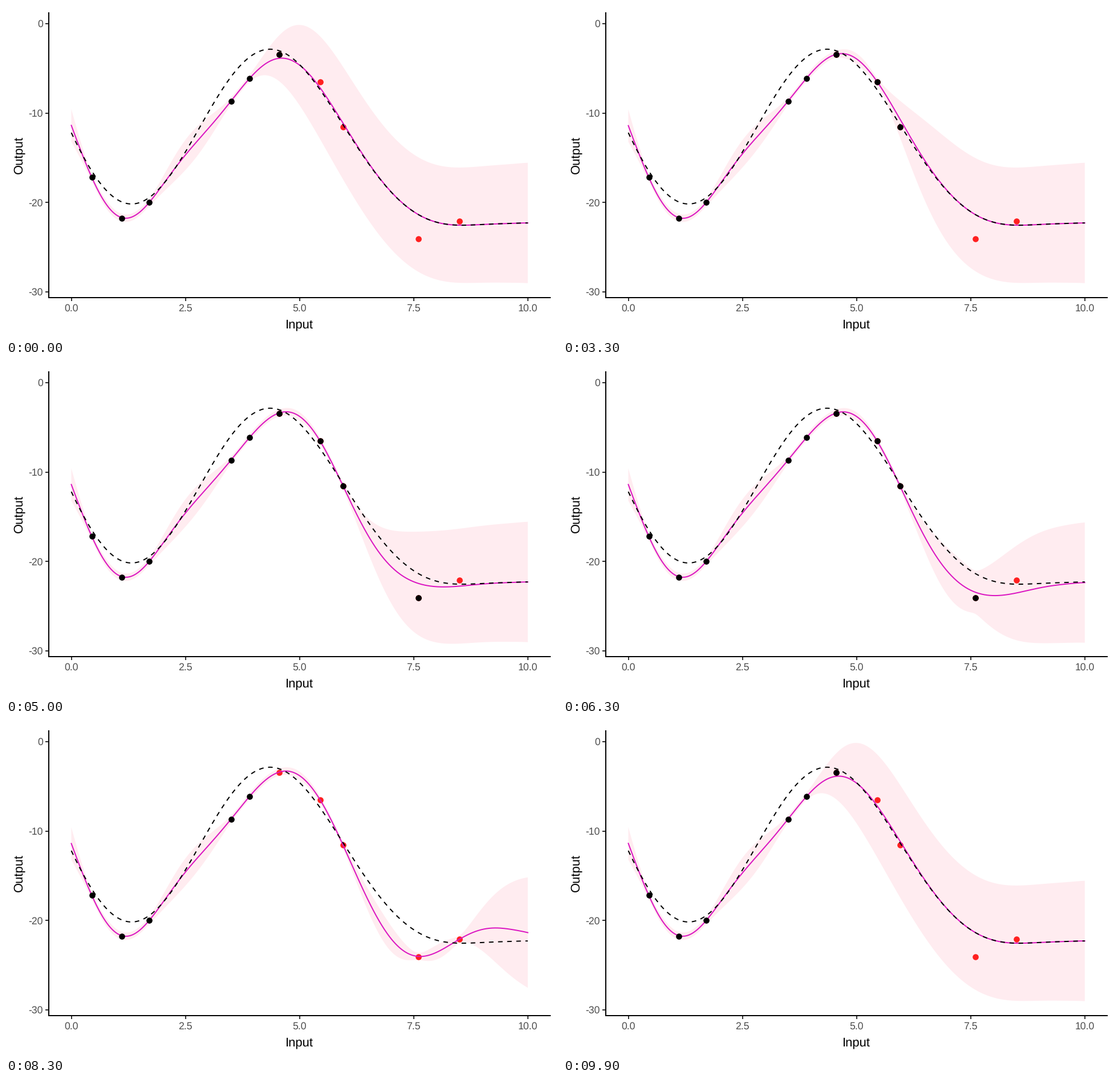
Animation of 966 by 580 pixels, one loop 10 s. Source, as a matplotlib script:

```python
import numpy as np
import matplotlib.pyplot as plt
from matplotlib.animation import FuncAnimation
from matplotlib.patches import Polygon

W, H, DPI = 966, 580, 100
FRAMES, INTERVAL = 100, 100
STARTS = [9, 26, 43, 59, 76, 92]    # first changed picture of each transition
STEPS = 8
REVEALED = [1, 2, 3, 4, 5, 0]       # black test points in each state
PX = 72 / DPI

plt.rcParams.update({
    "font.family": "Liberation Sans",
    "text.hinting": "none",
    "axes.unicode_minus": False,
})


def sx(x):
    return 114.5 + 80.03 * np.asarray(x)


def sy(y):
    return 31 - 15.667 * np.asarray(y)


# Prior mean: heights in pixels at every quarter unit, smoothed by a polynomial.
knots = [222, 262, 295.5, 321.5, 339, 347, 344, 333, 313.5, 287, 255.5,
         222, 187, 153, 122.5, 100, 85, 77, 77.5, 86.5, 102,
         124.5, 152, 183, 215, 245.5, 275, 301.5, 325, 345, 360.5,
         372, 379, 382.5, 383.8, 383.8, 383, 382, 381.2, 380.6, 380.2]
prior = np.polynomial.Chebyshev.fit(np.linspace(0, 10, 41), knots, 13)

obs_x = np.array([0.45, 1.1, 1.7, 3.5, 3.9, 4.55, 5.45, 5.95, 7.6, 8.5])
obs_y = np.array([300, 372, 344, 167, 127, 84.5, 132.5, 212, 407.5, 377])
N_TRAIN = 5

grid = np.linspace(0, 10, 501)
grid_px = sx(grid)
amp = 100.3 + np.where(grid > 7.6, 0.9, 0.2) * (grid - 7.6) ** 2


def kernel(a, b):
    return np.exp(-0.5 * (a[:, None] - b[None, :]) ** 2)


def posterior(n):
    """Mean and half band in pixels, given the first n observations."""
    x, y = obs_x[:n], obs_y[:n]
    k = kernel(x, x) + 0.004 * np.eye(n)
    ks = kernel(grid, x)
    weights = np.linalg.solve(k, ks.T).T
    mean = prior(grid) + weights @ (y - prior(x))
    var = 1 - np.sum(weights * ks, axis=1)
    return mean, amp * np.sqrt(np.maximum(var, 0))


states = [posterior(N_TRAIN + s) for s in range(6)]

fig = plt.figure(figsize=(W / DPI, H / DPI), dpi=DPI, facecolor="white")
ax = fig.add_axes([0, 0, 1, 1])
ax.set_xlim(0, W)
ax.set_ylim(H, 0)
ax.axis("off")


def line(xs, ys, color, z, width=2.0, **kw):
    return ax.plot(xs, ys, color=color, lw=width * PX, zorder=z, **kw)[0]


def dots(xs, ys, color, z):
    return ax.plot(sx(xs), ys, "o", color=color, ms=10.6 * PX, mew=0, zorder=z)[0]


def label(x, y, text, size, color, **kw):
    ax.text(x, y, text, fontsize=size * PX, color=color, va="baseline", **kw)


# Axes
line([74.5, 74.5], [11, 511], "black", 6, solid_capstyle="butt")
line([73.5, 955], [511, 511], "black", 6, solid_capstyle="butt")
for v in (0, -10, -20, -30):
    y = float(sy(v))
    line([69, 74], [y, y], "#333333", 5, solid_capstyle="butt")
    label(64.7, y + 6.3, str(v), 17.6, "#4D4D4D", ha="right")
for v in (0, 2.5, 5, 7.5, 10):
    x = float(sx(v))
    line([x, x], [511, 516.5], "#333333", 5, solid_capstyle="butt")
    label(x, 534.6, f"{v:.1f}", 17.6, "#4D4D4D", ha="center")
label(514.5, 564.5, "Input", 22, "black", ha="center")
ax.text(28.5, 261, "Output", fontsize=22 * PX, color="black", rotation=90,
        rotation_mode="anchor", ha="center", va="baseline")

# Chart
band = ax.add_patch(Polygon([(0, 0), (1, 1)], closed=True, fc="#FFECF0",
                            ec="none", zorder=1))
dots(obs_x[N_TRAIN:], obs_y[N_TRAIN:], "#FF2020", 2)
mean_line = line(grid_px, states[0][0], "#DB15C1", 3)
line(grid_px, prior(grid), "black", 4, dashes=(4, 4), dash_capstyle="butt")
black_dots = dots([], [], "black", 5)


def pose(i):
    """State, next state and progress between them."""
    for s, start in enumerate(STARTS):
        if i < start:
            return s, s, 0
        if i < start + STEPS - 1:
            return s, (s + 1) % 6, (i - start + 1) / STEPS
    return 0, 0, 0


def update(i):
    a, b, p = pose(i)
    mean, half = ((1 - p) * u + p * v for u, v in zip(states[a], states[b]))
    top = np.column_stack([grid_px, mean - half])
    bottom = np.column_stack([grid_px, mean + half])
    band.set_xy(np.vstack([top, bottom[::-1]]))
    mean_line.set_ydata(mean)
    n = N_TRAIN + min(REVEALED[a], REVEALED[b])
    black_dots.set_data(sx(obs_x[:n]), obs_y[:n])
    return band, mean_line, black_dots


anim = FuncAnimation(fig, update, frames=FRAMES, interval=INTERVAL,
                     repeat=True, repeat_delay=0, blit=False)
plt.show()
```
